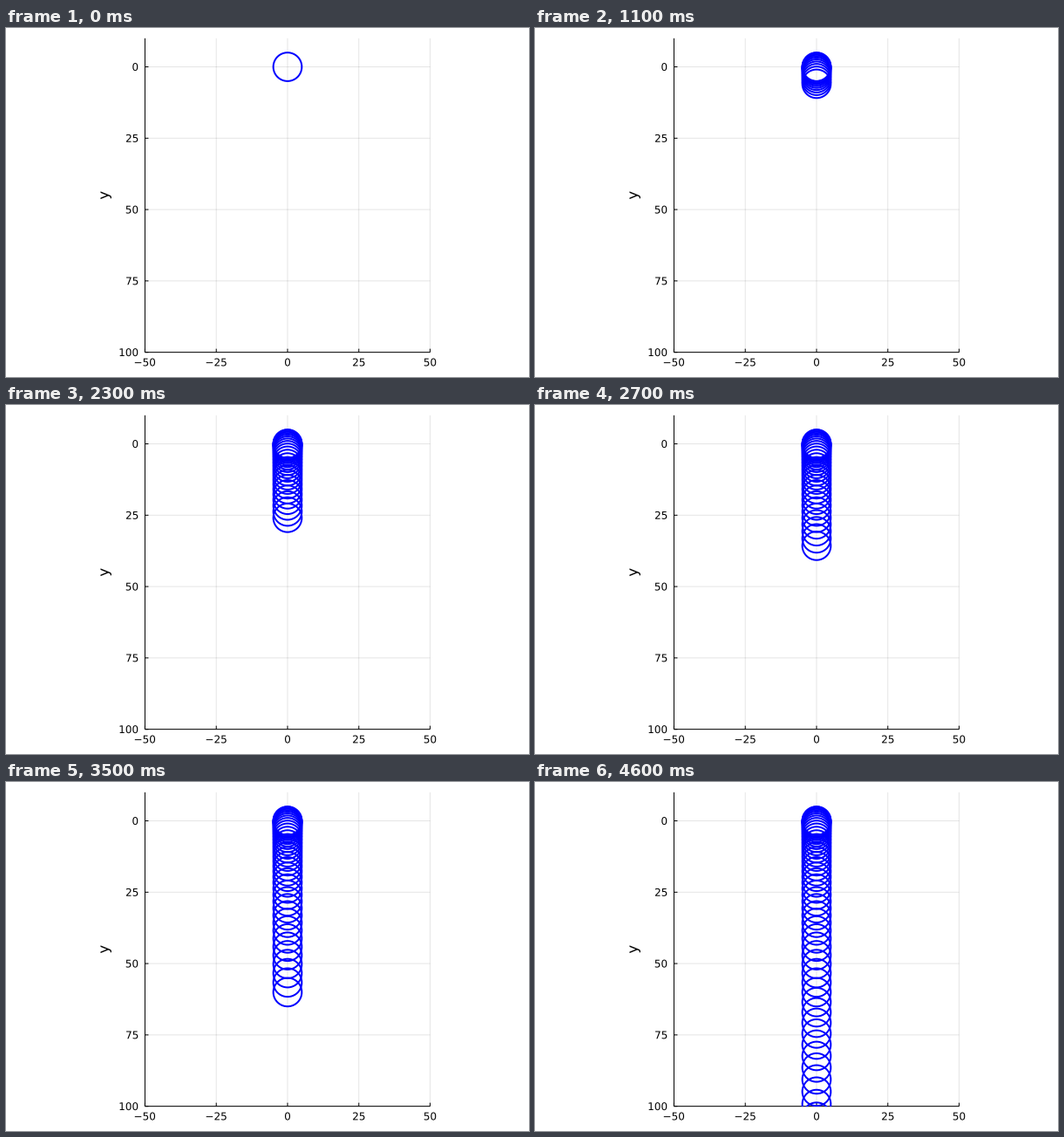
Recreate the animation shown at these times as a matplotlib script. Size 600x400 px, loop 5100 ms.

```python
import numpy as np
import matplotlib.pyplot as plt
from matplotlib.animation import FuncAnimation
from matplotlib.patches import PathPatch, Rectangle
from matplotlib.textpath import TextPath
from matplotlib.transforms import Affine2D

W, H, DPI = 600, 400, 100
BOTTOM, TOP, MID = 28.35, 388.19, 323.0   # plot area in pixels, y upwards
SCALE = (TOP - BOTTOM) / 110              # pixels per data unit
PX = 72 / DPI                             # points per pixel

G, DT, RADIUS = 9.8, 0.1, 5
DROPS, FRAMES = 47, 51


def px(x):
    return MID + SCALE * x


def py(y):
    return BOTTOM + SCALE * (100 - y)


LEFT, RIGHT = px(-50), px(50)

fig = plt.figure(figsize=(W / DPI, H / DPI), dpi=DPI, facecolor="white")
ax = fig.add_axes([0, 0, 1, 1])
ax.set(xlim=(0, W), ylim=(0, H))
ax.axis("off")


def line(xs, ys, **style):
    style = {"color": "black", "lw": PX, "solid_capstyle": "butt", **style}
    item, = ax.plot(xs, ys, snap=False, scalex=False, scaley=False, **style)
    return item


def label(text, x, y, size=12, align=0.5, angle=0):
    """Place text so that the fraction `align` of its ink width sits at x, y."""
    path = TextPath((0, 0), text, size=size)
    box = path.get_extents()
    shift = box.x0 + align * box.width
    place = Affine2D().translate(-shift, 0).rotate_deg(angle).translate(x, y)
    ax.add_patch(PathPatch(place.transform_path(path), fc="black", lw=0))


def draw_axes():
    x_ticks = range(-50, 51, 25)
    y_ticks = range(0, 101, 25)
    grid = dict(alpha=0.1, zorder=1)
    for v in x_ticks:
        line([px(v)] * 2, [BOTTOM, TOP], **grid)
        line([px(v)] * 2, [BOTTOM, BOTTOM + 4])
        label(str(v).replace("-", "\u2212"), px(v), 12.6)
    for v in y_ticks:
        line([LEFT, RIGHT], [py(v)] * 2, **grid)
        line([LEFT, LEFT + 4], [py(v)] * 2)
        label(str(v), 151.3, py(v) - 4.4, align=1)
    line([LEFT, RIGHT], [BOTTOM] * 2)
    line([LEFT] * 2, [BOTTOM, TOP])
    label("y", 117.5, (BOTTOM + TOP) / 2, size=16.5, angle=90)


def make_circle(n):
    a = np.linspace(0, 2 * np.pi, 200)
    y = G * (n * DT) ** 2 / 2
    ring = line(px(RADIUS * np.cos(a)), py(y + RADIUS * np.sin(a)),
                color="blue", lw=2 * PX, zorder=3)
    ring.set_clip_path(Rectangle((LEFT, BOTTOM), RIGHT - LEFT, TOP - BOTTOM,
                                 transform=ax.transData))
    return ring


draw_axes()
rings = [make_circle(n) for n in range(DROPS)]


def update(i):
    for n, ring in enumerate(rings):
        ring.set_visible(n <= i)
    return rings


anim = FuncAnimation(fig, update, frames=FRAMES, interval=100,
                     repeat=True, repeat_delay=0)
plt.show()
```
